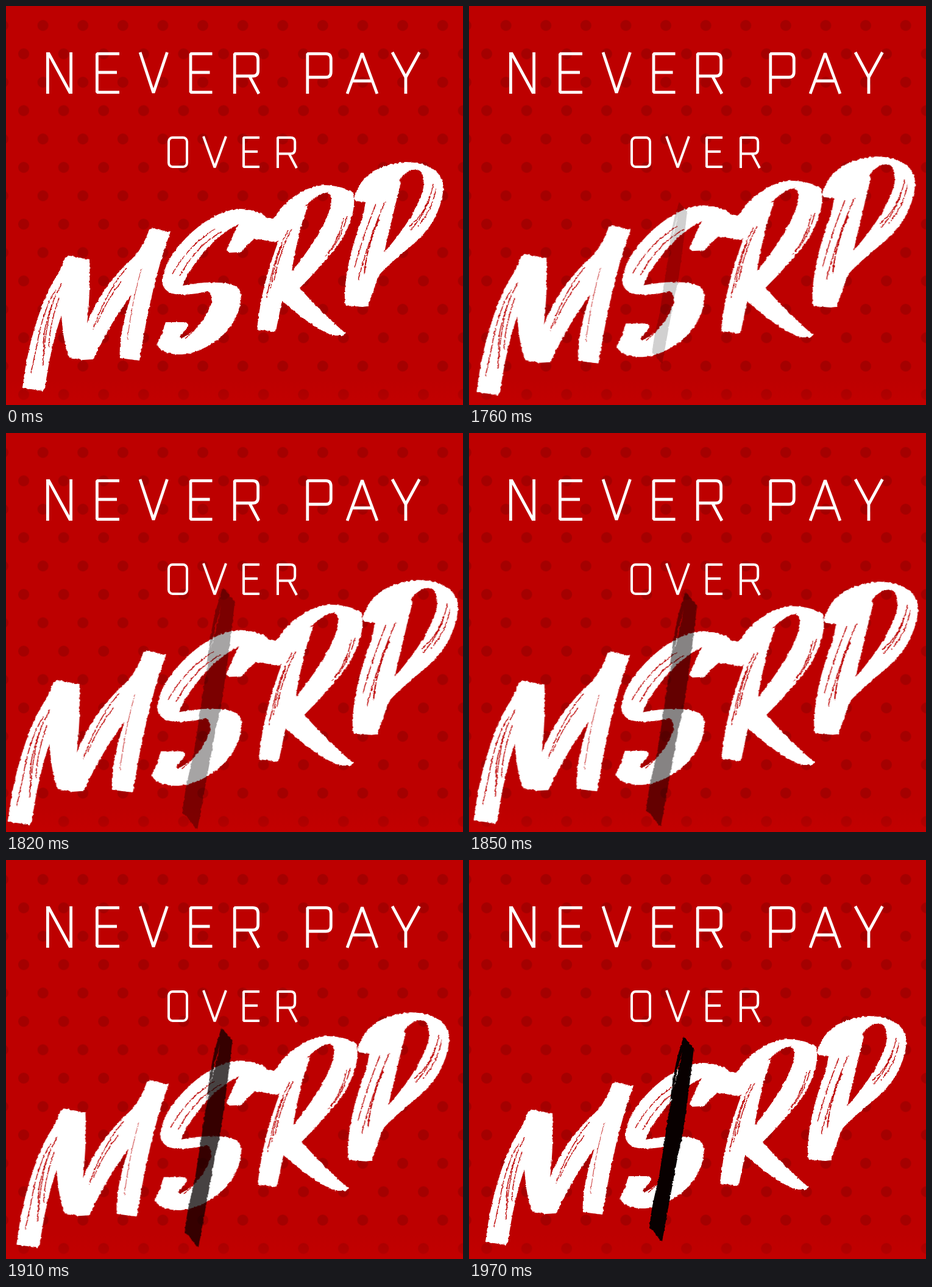
Animation of 750x655 px, one loop 4930 ms. Source, as an HTML page:

```html
<!DOCTYPE html>
<html lang="en">
<head>
<meta charset="utf-8">
<title>Never pay over MSRP</title>
<style>
  html, body { margin: 0; width: 100%; height: 100%; overflow: hidden; background: #bd0000; }
  svg { display: block; width: 100vw; height: 100vh; }
  .words { font-family: Roboto, sans-serif; fill: transparent; }
  .thin { fill: none; stroke: #fff; stroke-linejoin: bevel; }
  .dry { fill: none; stroke: #bd0000; stroke-dasharray: 19 2 31 1 11 3 24 2; }

  /* Pulse and slam advance in 30 ms steps: five out, five back */
  .pulse { transform-origin: 372.5px 470px; animation: pulse 4930ms infinite; }
  .slash { transform-origin: 332.5px 458px; animation: slam 4930ms infinite, fade 4930ms infinite; }

  @keyframes pulse {
    0%, 34.482% { transform: scale(1); animation-timing-function: steps(5, jump-start); }
    37.525% { transform: scale(1.07); animation-timing-function: steps(5, jump-start); }
    40.567%, 100% { transform: scale(1); }
  }
  @keyframes slam {
    0%, 34.482% { transform: translate(-8px, 0) scale(.2); animation-timing-function: steps(5, jump-start); }
    37.525% { transform: translate(0, -6px) scale(1.18); animation-timing-function: steps(5, jump-start); }
    40.567%, 100% { transform: translate(0, 0) scale(1); }
  }
  @keyframes fade {
    0% { opacity: 0; animation-timing-function: step-end; }
    34.482% { opacity: .01; animation-timing-function: steps(5, jump-none); }
    37.525% { opacity: .36; animation-timing-function: steps(5, jump-start); }
    40.567%, 100% { opacity: 1; }
  }
</style>
</head>
<body>
<svg viewBox="0 0 750 655" preserveAspectRatio="none">
  <defs>
    <pattern id="dots" x="12" y="9" width="65.6" height="93.2" patternUnits="userSpaceOnUse">
      <g fill="#a40000">
        <circle cx="48.6" cy="23" r="9"/>
        <circle cx="17" cy="69.6" r="9"/>
      </g>
    </pattern>
    <linearGradient id="glow" x2="0" y2="1">
      <stop offset="0" stop-color="#c80000" stop-opacity="0"/>
      <stop offset="1" stop-color="#c80000" stop-opacity=".5"/>
    </linearGradient>
    <filter id="rough" filterUnits="userSpaceOnUse" x="0" y="230" width="750" height="425" color-interpolation-filters="sRGB">
      <feTurbulence type="fractalNoise" baseFrequency=".22" numOctaves="2" seed="4"/>
      <feDisplacementMap in="SourceGraphic" scale="3.5" xChannelSelector="R" yChannelSelector="G"/>
    </filter>
  </defs>

  <rect width="750" height="655" fill="#bd0000"/>
  <rect width="750" height="655" fill="url(#dots)"/>
  <rect y="615" width="750" height="40" fill="url(#glow)"/>

  <!-- Selectable words under the drawn lettering -->
  <g class="words">
    <text x="66" y="144" font-size="90">NEVER PAY</text>
    <text x="265" y="266" font-size="70">OVER</text>
  </g>

  <g class="thin" stroke-width="4.8">
    <path d="M68.4 144V76M106.6 144V76M69.5 77L105.5 143"/>
    <path d="M186 78.4H149.4V141.6H186M149.4 109H182"/>
    <path d="M220 76L242 142.5L264.5 76"/>
    <path d="M338.5 78.4H303V141.6H338.5M303 109H334.5"/>
    <path d="M375.2 144V78.4H405q8.6 0 8.6 9V106q0 9-8.6 9H376M399.5 115L415 144"/>
    <path d="M494.8 144V78.4H525q8.3 0 8.3 9V108q0 9-8.3 9H495"/>
    <path d="M560 144L584.5 77.5L609 144M567.5 123H601.5"/>
    <path d="M634 76L656 117L678.5 76M656 116V144"/>
  </g>
  <g class="thin" stroke-width="4">
    <rect x="267" y="216" width="30" height="48" rx="6.5"/>
    <path d="M324 214L342.5 265L361 214"/>
    <path d="M416 216H390V264H416M390 239H413"/>
    <path d="M446 266V216H467q7.2 0 7.2 7V235q0 7.5-7.2 7.5H446M464.5 242.5L477 266"/>
  </g>

  <g class="pulse" role="img" aria-label="MSRP">
    <g filter="url(#rough)">
      <g fill="#fff" fill-rule="evenodd">
        <path d="M97 413L104 410L137 416Q139 470 133 521Q153 468 200 421Q222 404 235 367L240 365L270 371Q240 450 219 582L210 581L187 578Q184 540 206 474Q170 522 146 574L143 580L126 581L104 577Q95 560 91 508Q74 555 64 627L60 632L27 627Q38 535 72 462Q88 438 97 413Z"/>
        <path d="M425 346L421 341Q392 330 372 334Q326 345 285 392Q255 428 257 457Q262 474 290 474Q315 473 331 468Q341 475 336 492Q322 528 289 545L284 543L296 531L299 522L292 519L262 519L256 537L248 556Q255 572 288 572Q320 570 352 544Q386 512 386 474Q383 454 345 454Q320 453 290 459Q303 425 340 388Q360 368 382 358L372 378L362 400L366 405L386 404L396 392L408 382L436 386L440 350Z"/>
        <path d="M437 352Q470 300 520 294Q550 294 570 306Q577 340 548 388Q520 425 482 463Q520 506 557 537L553 541L537 541Q505 530 453 484L443 533L440 535L412 531Q416 490 426 452Q436 415 447 386L436 387L408 381Z
          M490 329Q513 308 527 306Q536 309 533 328Q522 370 469 436Q474 400 487 352L496 327Z"/>
        <path d="M571 316Q585 262 656 256Q716 258 718 300Q712 358 660 398Q628 424 611 443Q602 470 594 493L585 494L558 492L556 486Q554 440 576 372Q587 345 590 322L574 320Z
          M645 287Q655 270 674 268Q688 271 685 300Q672 346 621 404Q627 375 648 290Z"/>
      </g>
      <g class="dry" stroke-width="1.4">
        <path d="M92 455Q72 490 63 535L60 590M82 465Q60 500 50 560L41 602"/>
        <path d="M75 490Q65 530 62 575M87 480Q72 520 70 560"/>
        <path d="M198 430Q165 468 143 530M190 452Q165 482 150 520"/>
        <path d="M222 432Q207 485 199 548" stroke-width=".8"/>
        <path d="M354 371Q315 390 285 443M343 366Q300 392 273 440"/>
        <path d="M331 495Q320 525 294 546"/>
        <path d="M463 368Q440 410 428 478M469 366Q450 400 440 450"/>
        <path d="M453 392Q440 425 434 465"/>
        <path d="M554 348Q548 382 524 412M560 345Q552 375 535 400"/>
        <path d="M622 322Q596 380 578 450M607 325Q585 380 572 430"/>
        <path d="M612 350Q592 395 588 440" stroke-width="2"/>
        <path d="M701 292Q694 335 664 368M706 300Q699 335 676 362M695 312Q688 340 662 362"/>
      </g>
    </g>
  </g>

  <g class="slash">
    <path filter="url(#rough)" fill="#080000" fill-rule="evenodd" d="M352 290L361 300L369 309L366 335Q359 395 350 455L343 484Q329 560 317 626L312 622L305 612L296 603Q299 570 311 525Q320 470 328 412Q335 350 343 320Z
      M350 314L342 344L335 376L343.5 345Z
      M331 392L324 436L332.5 393Z"/>
  </g>
</svg>
</body>
</html>
```
